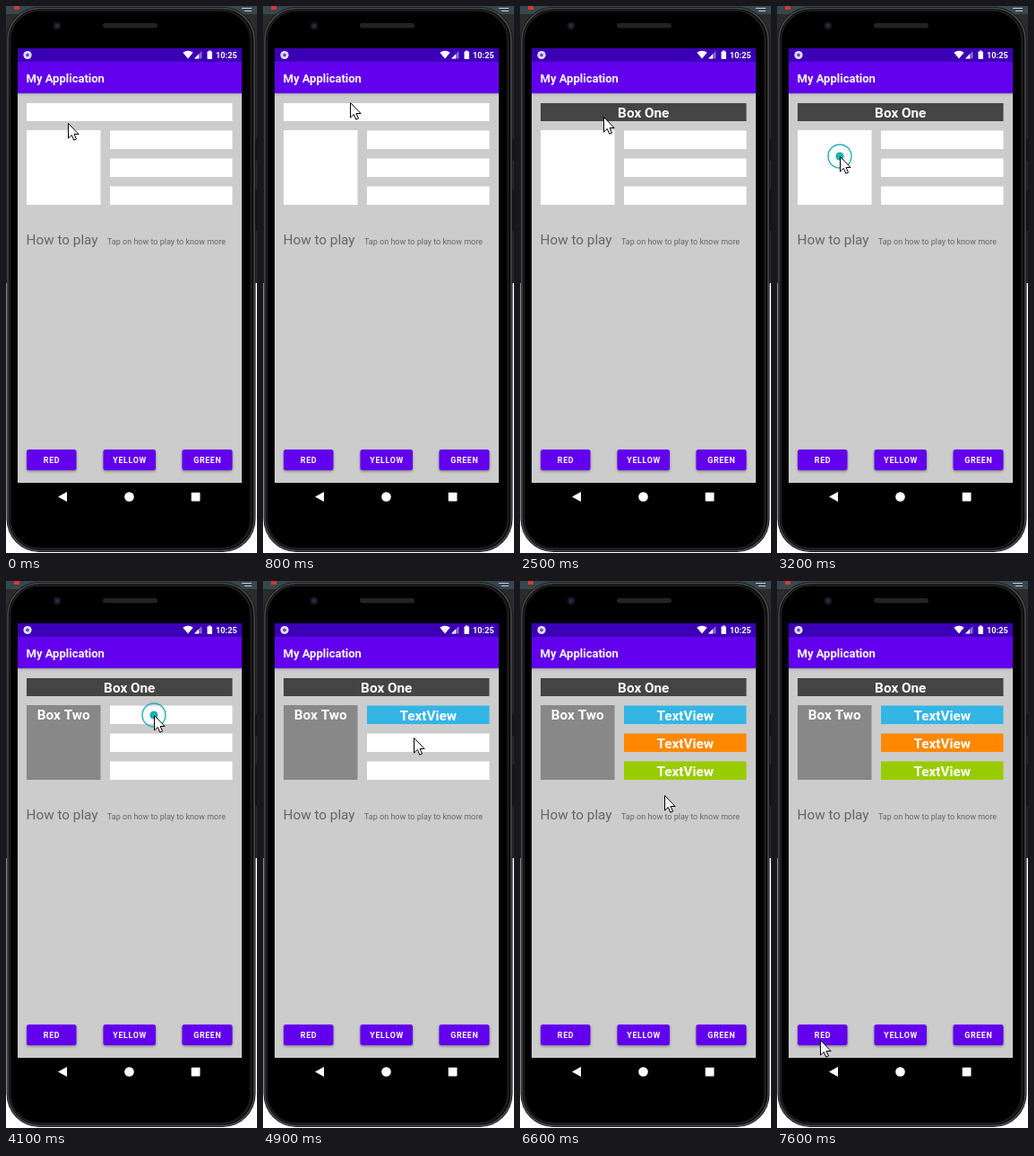
These frames come from a looping animation (280x608 px, 8000 ms). An HTML page with a canvas:

```html
<!DOCTYPE html>
<html lang="en">
<head>
<meta charset="utf-8">
<title>Tap to color</title>
<style>
  html, body { margin: 0; width: 100%; height: 100%; overflow: hidden; background: #000; }
  canvas { display: block; width: 280px; height: 608px; }
</style>
</head>
<body>
<canvas id="stage"></canvas>
<script>
const W = 280, H = 608, LOOP = 8000, STEP = 100;
const canvas = document.getElementById('stage');
const ctx = canvas.getContext('2d');
const dpr = window.devicePixelRatio || 1;
canvas.width = W * dpr;
canvas.height = H * dpr;

// Tiles turn from white to their colour when tapped.
const tiles = [
  { x: 23, y: 108, w: 229.5, h: 20, label: 'Box One', color: '#444444', at: 2400 },
  { x: 23, y: 138, w: 82.5, h: 83, label: 'Box Two', color: '#888888', at: 3400 },
  { x: 116, y: 138.5, w: 136.5, h: 20.5, label: 'TextView', color: '#33b5e5', at: 4300 },
  { x: 116, y: 169.5, w: 136.5, h: 20.5, label: 'TextView', color: '#ff8800', at: 5400 },
  { x: 116, y: 200.5, w: 136.5, h: 20.5, label: 'TextView', color: '#99cc00', at: 6500 }
];

const taps = [2100, 3100, 4000, 5100, 6200];

// Pointer keys: time, x, y
const path = [
  [0, 69, 130], [300, 69, 130], [400, 75, 120], [700, 75, 120],
  [800, 97, 107], [1300, 97, 107], [1600, 97, 115], [2400, 97, 115],
  [2800, 70, 167], [3400, 70, 167], [3700, 165, 149], [4300, 165, 149],
  [4700, 168, 174], [5500, 168, 174], [5900, 174, 208], [6500, 174, 208],
  [7000, 49, 496], [7200, 49, 496], [7600, 48, 510], [LOOP, 48, 510]
];

function rect(x, y, w, h, fill) {
  ctx.fillStyle = fill;
  ctx.fillRect(x, y, w, h);
}

function round(x, y, w, h, r, fill) {
  ctx.beginPath();
  ctx.roundRect(x, y, w, h, r);
  ctx.fillStyle = fill;
  ctx.fill();
}

function outline(x, y, w, h, r, color, width) {
  ctx.beginPath();
  ctx.roundRect(x, y, w, h, r);
  ctx.strokeStyle = color;
  ctx.lineWidth = width;
  ctx.stroke();
}

function disc(x, y, r, fill) {
  ctx.beginPath();
  ctx.arc(x, y, r, 0, Math.PI * 2);
  ctx.fillStyle = fill;
  ctx.fill();
}

function poly(points, fill) {
  ctx.beginPath();
  points.forEach(([x, y]) => ctx.lineTo(x, y));
  ctx.closePath();
  ctx.fillStyle = fill;
  ctx.fill();
}

function text(str, x, y, size, weight, color, align = 'left', spacing = 0) {
  ctx.font = `${weight} ${size}px Roboto, sans-serif`;
  ctx.letterSpacing = spacing + 'px';
  ctx.textAlign = align;
  ctx.fillStyle = color;
  ctx.fillText(str, x, y);
  ctx.letterSpacing = '0px';
}

function shadowed(blur, dy, alpha, draw) {
  ctx.save();
  ctx.shadowColor = `rgba(0,0,0,${alpha})`;
  ctx.shadowBlur = blur * dpr;
  ctx.shadowOffsetY = dy * dpr;
  draw();
  ctx.restore();
}

function drawPhone() {
  rect(0, 0, W, 308, '#2b2b2b');
  rect(0, 308, W, 300, '#fff');
  rect(0, 0, W, 9, '#37474f');
  rect(9, 0, 6, 4, '#d8382e');
  rect(263, 2, 11, 1, '#c5ccd0');
  rect(266, 5, 8, 1, '#c5ccd0');
  rect(277, 148, 3, 24, '#151515');
  rect(277, 204, 3, 46, '#151515');

  round(0.5, 1, 278, 606, 37, '#0c0c0c');
  outline(2, 2.5, 275, 603, 35.5, '#4c4c4c', 1.5);
  outline(4.5, 5, 269, 598, 33, '#222', 1.5);
  round(5.5, 6, 266, 596, 32, '#000');

  round(108, 19, 61, 5.5, 2.75, '#242322');
  disc(57, 22, 4.5, '#15161a');
  disc(57, 22, 2.3, '#252c48');
}

function drawStatusBar() {
  rect(13, 47, 250, 15, '#3b00b5');
  disc(24, 54.5, 4.6, '#e6dff7');
  disc(24, 54.5, 1.9, '#6f4bc4');

  ctx.beginPath();
  ctx.moveTo(203, 58.5);
  ctx.lineTo(197.3, 51.8);
  ctx.quadraticCurveTo(203, 47.6, 208.7, 51.8);
  ctx.closePath();
  ctx.fillStyle = '#fff';
  ctx.fill();

  poly([[210, 58.5], [218.5, 58.5], [218.5, 50]], 'rgba(255,255,255,.4)');
  poly([[210, 58.5], [215, 58.5], [215, 53.5]], '#fff');
  round(224.5, 50.5, 5.5, 8.5, 0.7, '#fff');
  rect(226, 49.5, 2.5, 1.2, '#fff');
  text('10:25', 257.7, 57.7, 9.2, 700, '#fff', 'right');
}

function drawButton(x, w, label) {
  shadowed(3, 1.2, 0.4, () => round(x, 493, w, 23, 2.5, '#6200ee'));
  text(label, x + w / 2 + 0.3, 507.8, 8.9, 700, '#fff', 'center', 0.65);
}

function drawScreen(t) {
  rect(13, 47, 250, 483, '#cccccc');
  ctx.save();
  ctx.beginPath();
  ctx.rect(13, 47, 250, 483);
  ctx.clip();
  shadowed(3, 1.2, 0.35, () => rect(13, 62, 250, 35, '#6200ee'));
  ctx.restore();
  drawStatusBar();
  text('My Application', 22.5, 84.5, 13, 700, '#fff');

  for (const b of tiles) {
    const on = t >= b.at;
    rect(b.x, b.y, b.w, b.h, on ? b.color : '#fff');
    if (on) text(b.label, b.x + b.w / 2, b.y + 16.3, 15.3, 700, '#fff', 'center');
  }

  text('How to play', 22.5, 265, 15.3, 400, '#656565');
  text('Tap on how to play to know more', 113, 265, 9, 400, '#656565');

  drawButton(23, 55.5, 'RED');
  drawButton(108.5, 58.5, 'YELLOW');
  drawButton(196.5, 56, 'GREEN');

  poly([[58, 545.5], [68, 540], [68, 551]], '#fff');
  disc(137.5, 545.5, 5.3, '#fff');
  round(206.7, 540.7, 9.8, 9.8, 0.8, '#fff');
}

function pointerAt(t) {
  const i = Math.max(1, path.findIndex(k => k[0] > t));
  const [t0, x0, y0] = path[i - 1];
  const [t1, x1, y1] = path[i];
  const u = (t - t0) / (t1 - t0);
  const e = u * u * (3 - 2 * u);
  return [Math.round(x0 + (x1 - x0) * e), Math.round(y0 + (y1 - y0) * e)];
}

function drawTap(t, x, y) {
  const start = taps.find(s => t >= s && t < s + 400);
  if (start === undefined) return;
  const k = (t - start) / STEP;
  if (k === 0) {
    disc(x, y, 1.8, '#7fdde0');
    return;
  }
  ctx.save();
  ctx.globalAlpha = 1 - (k - 1) * 0.35;
  ctx.beginPath();
  ctx.arc(x, y, 6 + 7 * k, 0, Math.PI * 2);
  ctx.strokeStyle = '#22afbb';
  ctx.lineWidth = 1.4;
  ctx.stroke();
  disc(x, y, 4.6, '#16a9cd');
  disc(x, y, 2.4, '#20c07c');
  ctx.restore();
}

function drawPointer(x, y) {
  const shape = [[0, 0], [0, 16.5], [3.8, 13], [6.3, 18.7], [9, 17.5], [6.6, 12], [11.6, 12]];
  poly(shape.map(([dx, dy]) => [x + dx + 0.5, y + dy + 0.5]), '#fff');
  ctx.strokeStyle = '#000';
  ctx.lineWidth = 1;
  ctx.stroke();
}

function render(now) {
  const t = Math.floor((now % LOOP) / STEP) * STEP;
  ctx.setTransform(dpr, 0, 0, dpr, 0, 0);
  drawPhone();
  drawScreen(t);
  const [x, y] = pointerAt(t);
  drawTap(t, x, y);
  drawPointer(x, y);
}

let origin;
function tick(now) {
  origin ??= now;
  render(Math.max(0, now - origin));
  requestAnimationFrame(tick);
}
render(0);
requestAnimationFrame(tick);
</script>
</body>
</html>
```
